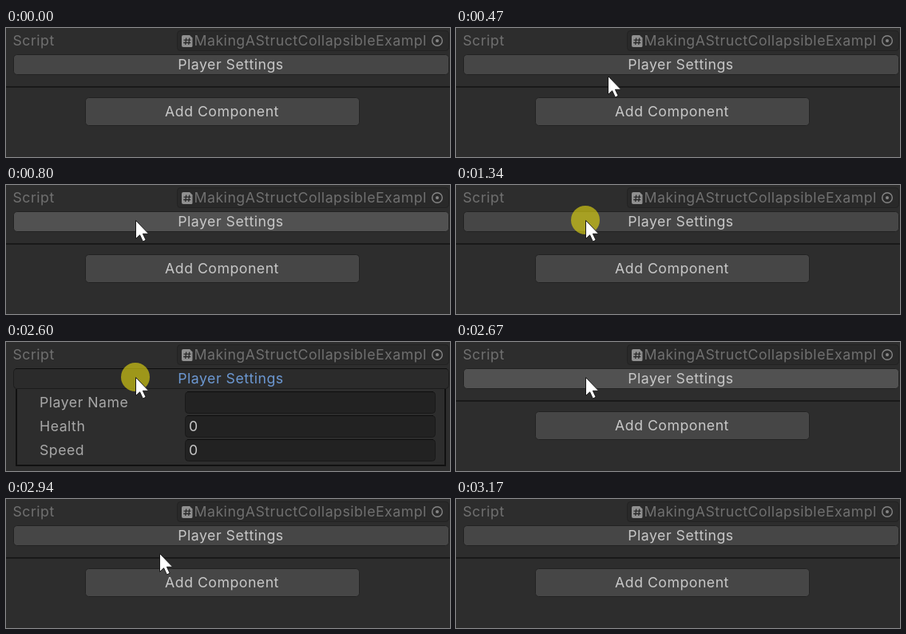
An HTML page that plays this animation: 556 px wide and 162 px high, repeating every 4.1 s.

```html
<!DOCTYPE html>
<html lang="en">
<head>
<meta charset="utf-8">
<title>Collapsible settings</title>
<style>
  html, body { margin: 0; width: 100%; height: 100%; overflow: hidden; background: #2d2d2d; }
  svg { display: block; width: 556px; height: 162px; }
  text { font: 17.7px Inter, sans-serif; letter-spacing: .5px; fill: #a8a8a8; }
  .title, .value { fill: #c8c8c8; }
  .dim { fill: #707070; }
  .button { fill: #464646; stroke: #222; }
  .hover { fill: #515151; }
  .field { fill: #222; stroke: #191919; }
  .edge { stroke: #0e0e0e; }
  .open .button { fill: #2b2b2b; stroke: #1c1c1c; }
  .open .title { fill: #6c98d2; }
  .open .closed-only, svg:not(.open) .open-only { display: none; }
</style>
</head>
<body>
<svg id="stage" viewBox="0 0 556 162">
  <text class="dim" x="8.5" y="22">Script</text>
  <rect x="214.5" y="3.5" width="340" height="25" rx="4" fill="#292929" stroke="#222"/>
  <path d="M222 9H230L233.5 12.5V22.5Q233.5 24 232 24H222Q220 24 220 22V11Q220 9 222 9Z" fill="#909090"/>
  <path d="M225.7 12.5L224.7 21M229.7 12.5L228.7 21M222.5 15.2H231.5M222.2 18.5H231.2" stroke="#292929" stroke-width="1.3"/>
  <text class="dim" x="235.5" y="22">MakingAStructCollapsibleExampl</text>
  <circle cx="540" cy="16" r="6.3" fill="none" stroke="#858585" stroke-width="1.4"/>
  <circle cx="540" cy="16" r="2" fill="#858585"/>

  <g class="open-only">
    <path d="M13 59V155H550V59" fill="none" stroke="#111" stroke-width="2"/>
    <g id="rows"></g>
  </g>
  <rect id="header" class="button" x="9.5" y="33.5" width="545" height="25" rx="4"/>
  <path class="edge open-only" d="M12 33.5H552"/>
  <text class="title" x="281.5" y="52" text-anchor="middle">Player Settings</text>

  <g class="closed-only">
    <rect y="73" width="556" height="2" fill="#191919"/>
    <rect class="button" x="99.5" y="87.5" width="343" height="35" rx="4"/>
    <text class="title" x="270.5" y="111" text-anchor="middle">Add Component</text>
  </g>

  <circle id="click" cx="162" cy="44" r="18" fill="#d2c814" fill-opacity=".69"/>
  <path id="cursor" d="M.5 .5V23.5L5.6 18.8L9.4 27L13.2 25.2L9.4 17.3H16.7Z" fill="#fff" stroke="#1c1c1c"/>
</svg>
<script>
const LOOP = 4100;
const find = id => document.getElementById(id);
const [stage, rows, header, click, cursor] =
  ['stage', 'rows', 'header', 'click', 'cursor'].map(find);

rows.innerHTML = [['Player Name', ''], ['Health', '0'], ['Speed', '0']].map(([label, value], i) => {
  const y = 62.5 + i * 30;
  return `<text x="42" y="${y + 19.5}">${label}</text>
    <rect class="field" x="224.5" y="${y}" width="313" height="27" rx="4"/>
    <path class="edge" d="M227 ${y}H535"/>
    <text class="value" x="229" y="${y + 19.5}">${value}</text>`;
}).join('');

// Pointer samples: start time, x, y; each is held until the next.
const pointer = [
  [400, 102, 92], [470, 190, 60], [540, 162, 35], [740, 162, 39], [800, 162, 44],
  [2870, 168, 50], [2940, 192, 68], [3010, 268, 106], [3100, 372, 146], [3170, 600, 200],
];

const between = (t, from, to) => t >= from && t < to;

function draw(now) {
  const t = now % LOOP;
  const [, x, y] = pointer.findLast(([start]) => start <= t) || [0, 600, 200];
  const pressed = between(t, 1340, 1410) || between(t, 2600, 2670);
  const over = between(x, 9, 555) && between(y, 33, 59);
  stage.classList.toggle('open', between(t, 1410, 2670));
  header.classList.toggle('hover', over && !pressed);
  click.setAttribute('visibility', pressed ? 'visible' : 'hidden');
  cursor.setAttribute('transform', `translate(${x} ${y})`);
}

const begin = performance.now();
(function frame() {
  draw(performance.now() - begin);
  requestAnimationFrame(frame);
})();
</script>
</body>
</html>
```
